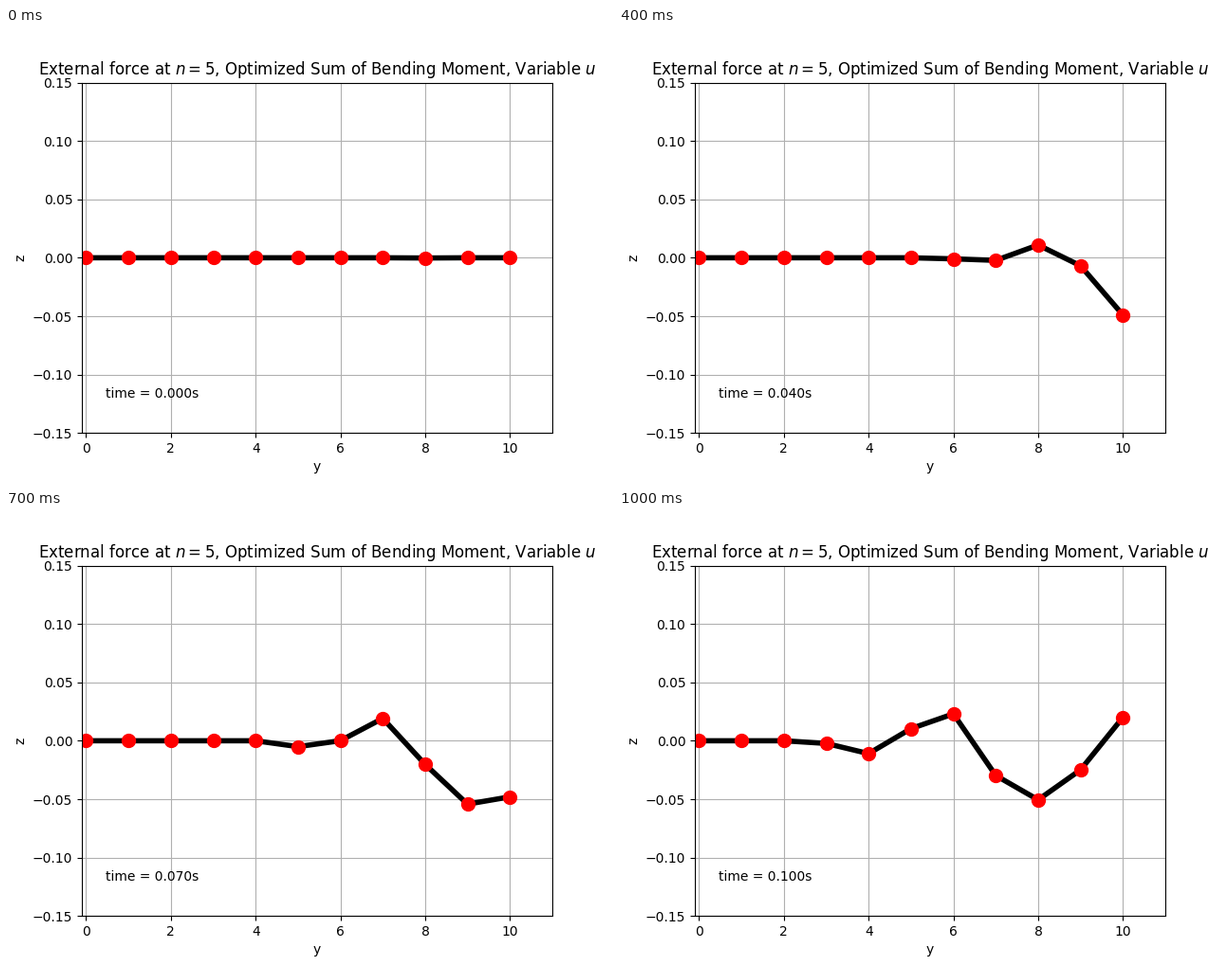
Write a matplotlib script that moves like this. It is 640 by 480 pixels and loops after 1.1 s.

```python
import numpy as np
import matplotlib.pyplot as plt
from matplotlib.animation import FuncAnimation

STEPS = 11
DT = 0.01
NODES = np.arange(11)
LAG = 10 - NODES  # distance from the free end


def ease(t, start, end):
    u = np.clip((t - start) / (end - start), 0, 1)
    return (1 - np.cos(np.pi * u)) / 2


def shape(t):
    """Wave leaving the free end: small dip, crest, deep trough, rebound."""
    t_dip = np.maximum(2.05 * LAG - 2.1, 0)
    t_crest = np.hypot(1.4, 2.37 * LAG)
    t_trough = t_crest + 3.4 + 0.3 * LAG

    dip = -0.37 * LAG * (LAG - 1)
    crest = 4.5 + 5 * LAG
    trough = -57 + 2.5 * LAG

    z = dip * ease(t, t_dip - 3, t_dip)
    z += (crest - dip) * ease(t, t_dip, t_crest)
    z += (trough - crest) * ease(t, t_crest, t_trough)
    z += 1.25 * np.maximum(t - t_trough, 0) ** 2.5
    return z / 1000


fig, ax = plt.subplots(figsize=(6.4, 4.8), dpi=100)
ax.set(xlim=(-0.1, 11), ylim=(-0.15, 0.15), xlabel="y", ylabel="z")
ax.set_title(r"External force at $n=5$, Optimized Sum of Bending Moment, "
             r"Variable $u$")
ax.grid()
beam, = ax.plot(NODES, shape(0), "o-", color="black", lw=4,
                ms=10, mfc="red", mec="red")
clock = ax.text(0.05, 0.1, "", transform=ax.transAxes)


def update(step):
    beam.set_ydata(shape(step))
    clock.set_text(f"time = {step * DT:.3f}s")
    return beam, clock


anim = FuncAnimation(fig, update, frames=STEPS, interval=100,
                     repeat=True, repeat_delay=0)
plt.show()
```
